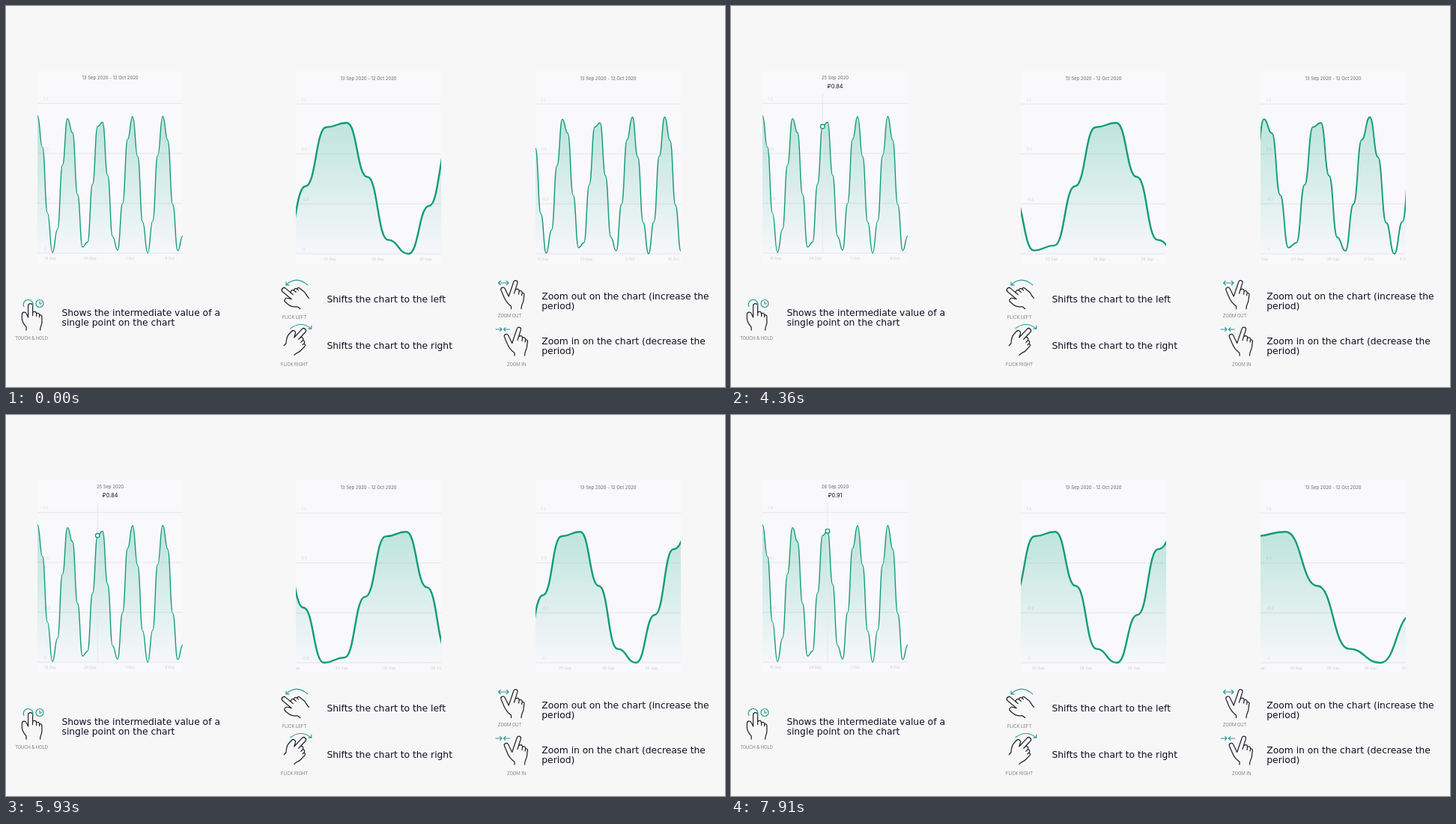
An HTML page with a canvas that plays this animation: 960x509 px, repeating every 8 s.

```html
<!DOCTYPE html>
<html lang="en">
<head>
<meta charset="utf-8">
<title>Chart gestures</title>
<style>
  html, body { margin: 0; width: 100%; height: 100%; overflow: hidden; background: #f7f7f7; }
  canvas { display: block; width: 960px; height: 509px; }
</style>
</head>
<body>
<canvas id="stage"></canvas>
<script>
const canvas = document.getElementById('stage');
const ctx = canvas.getContext('2d');
const ratio = window.devicePixelRatio || 1;
canvas.width = 960 * ratio;
canvas.height = 509 * ratio;

const LOOP = 8000, PANEL = 194, MID_SCALE = 27.5;
const TEAL = '#2a9a98', GREEN = '#129b79', INK = '#24252c';
const UI = 'Inter, sans-serif', BODY = '"DejaVu Sans", sans-serif', CAPTION = 'Roboto, sans-serif';
const TOP_VALUE = Math.cos(13);

// Keys are [time, value] pairs, joined by a monotone cubic.
const midPeakX = [[3380, 455], [4360, 514.3], [4920, 532], [5930, 534.5], [6650, 517], [7910, 432.8]];
const zoom = [[4180, 7.19], [4360, 10.87], [4920, 16.5], [5930, 24.9], [6650, 34], [7910, 42.2]];

function follow(keys, t) {
  const last = keys.length - 1;
  if (t <= keys[0][0]) return keys[0][1];
  if (t >= keys[last][0]) return keys[last][1];
  const i = keys.findIndex(k => k[0] > t) - 1;
  const slope = j => (keys[j + 1][1] - keys[j][1]) / (keys[j + 1][0] - keys[j][0]);
  const tangent = j => {
    if (j === 0 || j === last) return slope(Math.min(j, last - 1));
    const a = slope(j - 1), b = slope(j);
    return a * b <= 0 ? 0 : 2 * a * b / (a + b);
  };
  const [t0, v0] = keys[i], [t1, v1] = keys[i + 1];
  const span = t1 - t0, u = (t - t0) / span, w = 1 - u;
  return v0 * (1 + 2 * u) * w * w + span * tangent(i) * u * w * w
       + v1 * u * u * (3 - 2 * u) - span * tangent(i + 1) * u * u * w;
}

const ramp = (t, from, to) => Math.max(0, Math.min(1, (t - from) / (to - from)));
const mix = (a, b, u) => a + (b - a) * u;

function text(str, x, y, font, color, align = 'left') {
  ctx.font = font;
  ctx.fillStyle = color;
  ctx.textAlign = align;
  ctx.fillText(str, x, y);
}

function line(x1, y1, x2, y2, color, width = 1) {
  ctx.strokeStyle = color;
  ctx.lineWidth = width;
  ctx.beginPath();
  ctx.moveTo(x1, y1);
  ctx.lineTo(x2, y2);
  ctx.stroke();
}

function dateLabel(day) {
  const n = Math.round(day) + 13;
  return n <= 30 ? n + ' Sep' : (n - 30) + ' Oct';
}

function tickStep(scale) {
  if (scale < 7) return 7.95;
  if (scale < 9) return 8.1;
  if (scale < 20) return 4.37;
  return scale < 37 ? 2.32 : 1.18;
}

// One panel: cos(day) over 30 days, with the visible minimum on the bottom line.
function chart({ x, bottom, center, scale, min, picked }) {
  const unit = 175 / (TOP_VALUE - min);
  const px = d => x + PANEL / 2 + (d - center) * scale;
  const py = d => bottom - (Math.cos(d) - min) * unit;

  ctx.fillStyle = '#f9f8fb';
  ctx.fillRect(x, 87, PANEL, 257);
  const title = picked ? dateLabel(picked) + ' 2020' : '13 Sep 2020 - 12 Oct 2020';
  text(title, x + 97, bottom - 232.4, '5.95px ' + UI, '#66666b', 'center');
  if (picked) {
    text('₽' + Math.cos(picked).toFixed(2), x + 97, 109.6, '500 7.2px ' + UI, '#2b2b30', 'center');
  }

  ctx.save();
  ctx.beginPath();
  ctx.rect(x, 87, PANEL, 257);
  ctx.clip();

  for (let i = 0; i < 4; i++) {
    const y = bottom - i * 200 / 3;
    line(x, y, x + PANEL, y, '#e6e4e8');
    text(+(min + i * 200 / 3 / unit).toFixed(1), x + 7.5, y - 4.2, '5px ' + UI, '#d3d1d5');
  }

  const step = tickStep(scale), shift = scale < 9 ? 0.5 : 0;
  for (let i = -6; i <= 6; i++) {
    const day = 14.5 + (i + shift) * step;
    if (day >= 0 && day <= 29) {
      text(dateLabel(day), px(day), bottom + 9.2, '5px ' + UI, '#cccace', 'center');
    }
  }

  const curve = new Path2D();
  curve.moveTo(px(0), py(0));
  for (let d = 1; d < 30; d++) {
    const half = px(d - 0.5);
    curve.bezierCurveTo(half, py(d - 1), half, py(d), px(d), py(d));
  }
  const area = new Path2D(curve);
  area.lineTo(px(29), bottom);
  area.lineTo(px(0), bottom);
  const shade = ctx.createLinearGradient(0, 145, 0, bottom);
  shade.addColorStop(0, 'rgba(20, 172, 134, .27)');
  shade.addColorStop(1, 'rgba(20, 172, 134, .01)');
  ctx.fillStyle = shade;
  ctx.fill(area);

  if (picked) line(px(picked), 117, px(picked), bottom, '#e8e7eb');
  ctx.strokeStyle = GREEN;
  ctx.lineWidth = Math.min(2.4, 0.65 + 0.11 * scale);
  ctx.stroke(curve);
  if (picked) {
    ctx.beginPath();
    ctx.arc(px(picked), py(picked), 2.8, 0, 7);
    ctx.fillStyle = '#fff';
    ctx.fill();
    ctx.lineWidth = 1.3;
    ctx.stroke();
  }
  ctx.restore();
}

// Hands are drawn around the tip of the pointing finger.
const pointHand = new Path2D('M-5.5 35.5V31.5C-8 28.5-11.2 25-11.2 20V14.5C-11.2 11.2-6.5 10.8-5.4 13.4L-3 18.5V3'
  + 'a3 3 0 0 1 6 0V16M3 12.6c.8-2.4 4.9-2.2 5 .8V17M8 14c.8-1.9 4-1.6 4 1V18'
  + 'M12 16c.9-1.3 3.3-.9 3.3 1.3V25C15.3 29 13 30.5 13 35.5');
const pinchHand = new Path2D('M-6 38V34.5C-11 31-14 26.5-16 21.5L-19.6 13'
  + 'C-20.6 9.7-16 8-14.4 11L-9.3 21.5L-2.7 2C-1.4-1.2 3.3 .2 2.4 3.4L-2 17.5'
  + 'M0 12.5c2.2-1.8 5-.5 4.6 2.2L4 18.5M4.6 14.6c2-1.5 4.4-.3 4 2.2L8.1 20'
  + 'M8.6 17.2c1.6-.8 3 .2 2.8 1.9L10.4 27C9.8 31 7.5 32.5 7.5 38');

const tealMarks = new Path2D(
  'M24 402A6.4 6.4 0 1 1 35.6 401M50 397.5a5 5 0 1 1-10 0a5 5 0 1 1 10 0M45 394.5V397.8H47.8'
  + 'M403 373Q388 359.5 374 372.5M374 368.5V372.8H378.5'
  + 'M379.5 431Q394 420 407.5 431M407.8 426.8V431.2H403.4'
  + 'M657.5 370H671M660.5 367L657.5 370L660.5 373M668 367L671 370L668 373'
  + 'M653.5 432H662M659.3 429.3L662 432L659.3 434.7M673 432H664.5M667.2 429.3L664.5 432L667.2 434.7');

function hand(path, x, y, degrees = 0) {
  ctx.save();
  ctx.translate(x, y);
  ctx.rotate(degrees * Math.PI / 180);
  ctx.strokeStyle = INK;
  ctx.lineWidth = 1.25;
  ctx.lineCap = ctx.lineJoin = 'round';
  ctx.stroke(path);
  ctx.restore();
}

function legend() {
  hand(pointHand, 32.6, 397.5);
  hand(pointHand, 369, 377.5, -50);
  hand(pointHand, 399.5, 431.5, 43);
  hand(pinchHand, 680.5, 366.5);
  hand(pinchHand, 685, 429);
  ctx.strokeStyle = TEAL;
  ctx.lineWidth = 1.2;
  ctx.stroke(tealMarks);

  const caption = (str, x, y) => text(str, x, y, '300 6.3px ' + CAPTION, '#55555a', 'center');
  caption('TOUCH & HOLD', 34, 446.2);
  caption('FLICK LEFT', 385, 418.2);
  caption('FLICK RIGHT', 385, 480.7);
  caption('ZOOM OUT', 672.5, 415.9);
  caption('ZOOM IN', 681.8, 480.8);

  const note = (x, y, ...rows) => rows.forEach((row, i) =>
    text(row, x, y + i * 13, '12.3px ' + BODY, '#0e0d26'));
  note(74.5, 414, 'Shows the intermediate value of a', 'single point on the chart');
  note(428.5, 396, 'Shifts the chart to the left');
  note(428.5, 458, 'Shifts the chart to the right');
  note(715.3, 392, 'Zoom out on the chart (increase the', 'period)');
  note(715.3, 452, 'Zoom in on the chart (decrease the', 'period)');
}

function draw(t) {
  ctx.setTransform(ratio, 0, 0, ratio, 0, 0);
  ctx.fillStyle = '#f7f7f7';
  ctx.fillRect(0, 0, 960, 509);

  const picked = t < 3400 ? 0 : t < 6300 ? 12 : 13;
  chart({ x: 42, bottom: 330.2, center: 14.5, scale: PANEL / 29, min: -1, picked });

  const lifted = ramp(t, 4790, 5190) - ramp(t, 6490, 6930);
  chart({
    x: 387, bottom: 331, scale: MID_SCALE,
    center: 13 + (484 - follow(midPeakX, t)) / MID_SCALE,
    min: mix(Math.cos(16), Math.cos(9), lifted)
  });

  chart({
    x: 707, bottom: 331, center: 14.5, scale: follow(zoom, t),
    min: mix(-1, Math.cos(16), ramp(t, 4830, 5230))
  });
  legend();
}

function frame() {
  draw(performance.now() % LOOP);
  requestAnimationFrame(frame);
}
frame();
</script>
</body>
</html>
```
